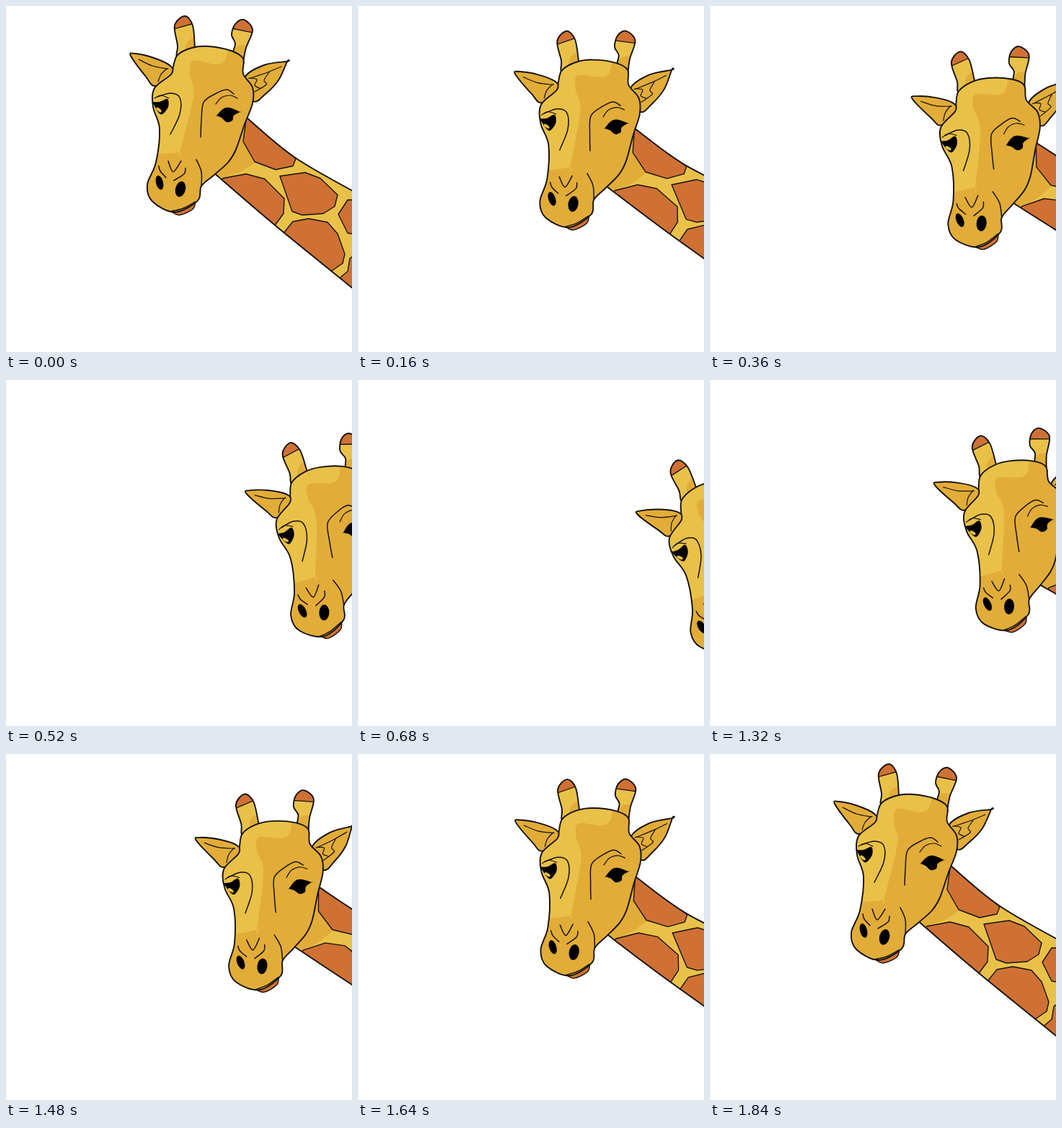
An HTML page with a canvas that plays this animation: 480 px wide and 480 px high, repeating every 2.8 s.

```html
<!DOCTYPE html>
<html>
<head>
<meta charset="utf-8">
<style>
html, body { margin: 0; width: 100%; height: 100%; overflow: hidden; background: #fff; }
canvas { display: block; width: 480px; height: 480px; }
</style>
</head>
<body>
<canvas id="stage" width="480" height="480"></canvas>
<script>
const ctx = document.getElementById('stage').getContext('2d');
const LIGHT = '#e9c149', DARK = '#e2ac38', ORANGE = '#cf7134', INK = '#15120d';
const STEP = 40, TURN = 880, HOME = 1840, LOOP = 2800, REACH = 257;

// Key points "x,y x,y"; smooth paths pass through every point, a repeated point is a corner.
function path(text, closed, smooth) {
  const pts = text.split(' ').map(s => s.split(',').map(Number));
  const n = pts.length;
  const at = i => closed ? pts[(i + n) % n] : pts[Math.max(0, Math.min(n - 1, i))];
  const p = new Path2D();
  p.moveTo(...pts[0]);
  for (let i = 0; i < (closed ? n : n - 1); i++) {
    const [a, b, c, d] = [at(i - 1), at(i), at(i + 1), at(i + 2)];
    if (smooth) {
      p.bezierCurveTo(b[0] + (c[0] - a[0]) / 6, b[1] + (c[1] - a[1]) / 6,
        c[0] - (d[0] - b[0]) / 6, c[1] - (d[1] - b[1]) / 6, ...c);
    } else p.lineTo(...c);
  }
  if (closed) p.closePath();
  return p;
}
const blob = text => path(text, true, true);
const poly = text => path(text, true, false);
const curve = text => path(text, false, true);

function oval(x, y, rx, ry, tilt) {
  const p = new Path2D();
  p.ellipse(x, y, rx, ry, tilt, 0, 7);
  return p;
}

// Everything above a slanted line through x,y.
function above(x, y, slope) {
  return poly(`${x - 30},${y - 30 * slope} ${x + 30},${y + 30 * slope} ${x + 30},-20 ${x - 30},-20`);
}

const neck = blob('289,232 289,232 373,304 500,407 500,407 500,267 500,267 402,211 334,155 334,155');
const neckShade = poly('334,155 329,189 346,217 326,230 301,239 280,230');
const spots = [
  '334,150 402,212 398,222 374,227 345,216 329,188',
  '296,245 301,239 333,233 359,240 386,267 385,288 365,315',
  '380,236 415,231 436,239 460,262 456,278 440,288 411,290 397,285',
  '383,322 386,314 398,299 420,295 446,300 460,316 470,344 467,357 445,372',
  '500,415 460,380 474,368 477,350 500,335',
  '500,269 474,269 461,289 474,315 500,319'
].map(poly);

const leftEar = blob('173,69 179,66 205,72 228,83 231,95 207,111 194,98');
const rightEar = blob('331,100 358,82 390,77 390,77 378,103 360,122 343,132');
const leftHorn = blob('237,70 238,55 234,27 248,14 259,27 262,58 262,58 250,76');
const rightHorn = blob('315,68 318,52 313,40 318,25 330,19 342,33 333,58 329,78 329,78');
const horns = [
  [leftHorn, above(247, 28, -0.28), oval(262, 61, 14, 16, 0)],
  [rightHorn, above(328, 34, 0.2), oval(328, 68, 14, 14, 0)]
];

const head = blob('238,68 258,58 281,56 312,62 329,73 329,94 342,113 342,135 331,164 319,199 ' +
  '308,217 288,235 271,250 266,270 234,286 203,271 196,248 208,217 213,170 204,140 206,114 229,95 232,84');
const faceLight = blob('180,40 300,40 306,68 294,81 260,76 255,95 260,125 241,203 241,203 212,205 180,203');
const lip = blob('228,284 228,284 240,290 259,282 263,270 263,270 247,279');

const fineLines = [
  '184,74 203,83 223,87 223,87 215,95 211,105',
  '382,84 363,92 339,100 339,100 348,102 345,110 352,114',
  '365,92 358,103 361,109 345,119',
  '206,128 215,124 226,128',
  '291,136 299,127 311,124 321,128'
].map(curve);
const boldLines = [
  '210,126 228,121 241,127 241,150 228,178',
  '270,182 271,160 274,134 290,122 306,116 316,122',
  '225,215 232,230 243,215',
  '212,222 214,229 222,238',
  '249,225 247,233 233,242',
  '264,213 271,230 271,250',
  '228,285 245,281 262,272'
].map(curve);

const blacks = [
  blob('203,133 203,133 213,133 224,129 225,140 217,150 211,147'),
  blob('292,152 292,152 301,143 310,141 325,147 325,147 316,152 314,159 306,161 299,155'),
  oval(213, 245, 5, 10, -0.25),
  oval(242, 254, 7, 11, 0.25)
];
const eyeGleam = oval(212, 144, 4.5, 2, 0.7);

function draw(shape, fill, width = 1.9) {
  if (fill) {
    ctx.fillStyle = fill;
    ctx.fill(shape);
  }
  if (width) {
    ctx.lineWidth = width;
    ctx.stroke(shape);
  }
}

// Fills a shape, shades it inside its own outline, then inks the outline.
function shaded(shape, fill, shades) {
  draw(shape, fill, 0);
  ctx.save();
  ctx.clip(shape);
  for (const [part, color, width] of shades) draw(part, color, width);
  ctx.restore();
  draw(shape);
}

function giraffe() {
  shaded(neck, LIGHT, [[neckShade, DARK, 0], ...spots.map(s => [s, ORANGE, 1.4])]);
  draw(leftEar, DARK);
  draw(rightEar, DARK);
  for (const [horn, tip, shade] of horns) shaded(horn, LIGHT, [[shade, DARK, 0], [tip, ORANGE, 1.3]]);
  draw(lip, ORANGE, 1.4);
  shaded(head, DARK, [[faceLight, LIGHT, 0]]);
  for (const line of fineLines) draw(line, null, 1.2);
  for (const line of boldLines) draw(line, null, 1.5);
  for (const black of blacks) draw(black, '#000', 0);
  draw(eyeGleam, LIGHT, 0);
}

// Sideways shift: out to the right, then back home a little softer, then rest.
function shiftAt(t) {
  if (t < TURN) return REACH * (t / TURN) ** 1.07;
  return REACH * Math.max(0, (HOME - t) / (HOME - TURN)) ** 1.15;
}

const start = performance.now();
function frame() {
  const t = (performance.now() - start) % LOOP;
  const shift = shiftAt(Math.floor(t / STEP) * STEP);
  ctx.setTransform(1, 0, 0, 1, 0, 0);
  ctx.fillStyle = '#fff';
  ctx.fillRect(0, 0, 480, 480);
  ctx.translate(248 + shift, 14 + shift / 2);
  ctx.rotate(-shift / 11.5 * Math.PI / 180);
  ctx.translate(-248, -14);
  ctx.strokeStyle = INK;
  ctx.lineCap = ctx.lineJoin = 'round';
  giraffe();
  requestAnimationFrame(frame);
}
frame();
</script>
</body>
</html>
```
